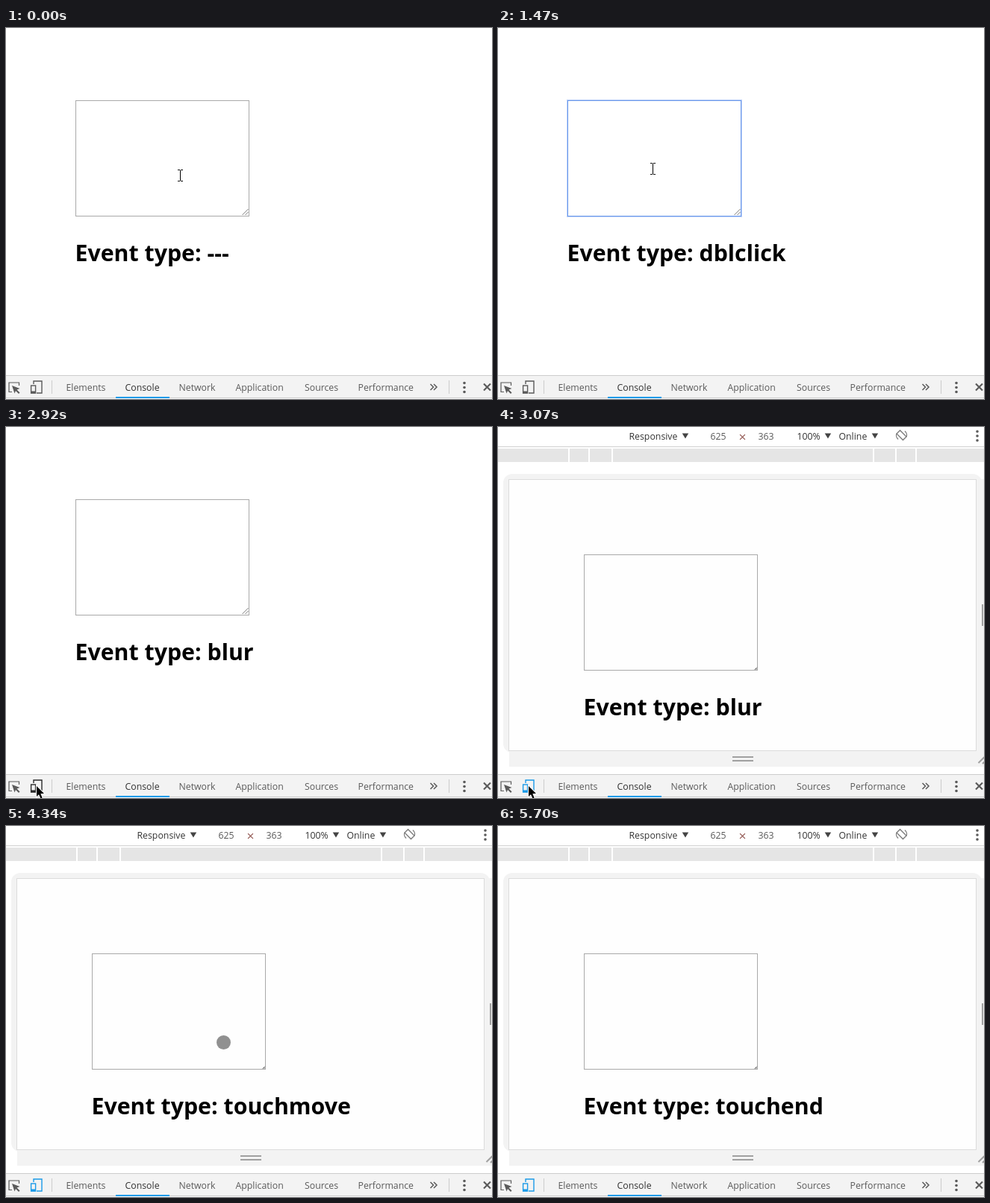
An HTML page with a canvas for the animation above (6140 ms loop, 651 px wide and 498 px high).

```html
<!DOCTYPE html>
<html lang="en">
<head>
<meta charset="utf-8">
<title>Event type</title>
<style>
  html, body { margin: 0; width: 100%; height: 100%; overflow: hidden; background: #fff; }
  canvas { display: block; }
</style>
</head>
<body>
<canvas id="stage" width="651" height="498"></canvas>
<script>
const ctx = document.getElementById('stage').getContext('2d');
const LOOP = 6140;
const FONT = '"Open Sans", "Noto Sans", sans-serif';
const INK = '#5a5a5a';
const BLUE = '#1a9ae8';

// Pointer track: start time, kind, hot spot
const POINTER = [
  [0, 'beam', 233, 198], [120, 'beam', 223, 196], [270, 'beam', 211, 194],
  [1040, 'beam', 207, 189], [1770, 'beam', 225, 230], [1890, 'beam', 253, 300],
  [2010, 'arrow', 246, 354], [2410, 'arrow', 203, 380], [2530, 'arrow', 156, 406],
  [2680, 'arrow', 108, 441], [2800, 'arrow', 66, 468], [2920, 'arrow', 41, 482],
  [3340, 'arrow', 171, 429], [3460, 'touch', 241.5, 393.5], [3610, 'touch', 250.5, 322.5],
  [3760, 'touch', 231.5, 290.5], [4340, 'touch', 291.5, 290.5], [4490, 'touch', 299.5, 289.5],
  [4640, 'touch', 257.5, 289], [4760, 'touch', 205.5, 288.5], [4880, 'touch', 170.5, 288.5],
  [5310, 'touch', 202.5, 298.5], [5460, 'touch', 481.5, 428.5], [5580, 'arrow', 569, 482],
  [5700, 'none', 0, 0]
];
const EVENTS = [
  [0, '---'], [640, 'focus'], [1470, 'dblclick'], [2160, 'blur'],
  [3880, 'touchstart'], [4340, 'touchmove'], [5000, 'touchend']
];
const CARET = [[0, false], [640, true], [1160, false], [1620, true], [2160, false]];

const at = (track, t) => track.filter(k => k[0] <= t).pop();

function rect(x, y, w, h, color) {
  ctx.fillStyle = color;
  ctx.fillRect(x, y, w, h);
}

function box(x, y, w, h, color, width = 1) {
  ctx.strokeStyle = color;
  ctx.lineWidth = width;
  ctx.strokeRect(x, y, w, h);
}

function line(points, color, width = 1) {
  ctx.strokeStyle = color;
  ctx.lineWidth = width;
  ctx.beginPath();
  points.forEach(p => ctx.lineTo(...p));
  ctx.stroke();
}

function poly(points, color) {
  ctx.fillStyle = color;
  ctx.beginPath();
  points.forEach(p => ctx.lineTo(...p));
  ctx.fill();
}

function disc(x, y, r, color) {
  ctx.fillStyle = color;
  ctx.beginPath();
  ctx.arc(x, y, r, 0, Math.PI * 2);
  ctx.fill();
}

function text(str, x, y, color = INK, font = '12.3px ') {
  ctx.font = font + FONT;
  ctx.fillStyle = color;
  ctx.fillText(str, x, y);
}

function dots(x, y) {
  for (let i = 0; i < 3; i++) disc(x, y + i * 6, 1.8, INK);
}

function cross(x, y, r, color, width) {
  line([[x - r, y - r], [x + r, y + r]], color, width);
  line([[x + r, y - r], [x - r, y + r]], color, width);
}

function textarea(x, y, focused, caret) {
  if (focused) {
    box(x - 0.5, y - 0.5, 234, 157, 'rgba(91,141,239,.4)');
    box(x + 0.5, y + 0.5, 232, 155, '#6a98ea');
  } else {
    box(x + 0.5, y + 0.5, 232, 155, '#a9a9a9');
  }
  if (caret) rect(x + 3, y + 4, 1, 13, '#000');
}

function devtools(t, device) {
  rect(0, 466, 651, 32, '#f3f3f3');
  rect(0, 466, 651, 1, '#ccc');
  rect(0, 496, 651, 1, '#ccc');
  rect(0, 497, 651, 1, '#fff');

  // Inspect icon
  line([[17.5, 480], [17.5, 476], [4, 476], [4, 488.5], [8, 488.5]], INK, 1.2);
  poly([[8, 480], [18.5, 484], [14.5, 485.5], [18.5, 489.5], [17, 491], [13, 487], [11.5, 490.5]], INK);

  // Device icon
  const color = device ? BLUE : t >= 2920 ? '#2b2b2b' : INK;
  line([[37, 478], [37, 474], [48, 474], [48, 490], [41, 490]], color, 1.4);
  box(33.6, 480, 6, 10, color, 1.4);
  rect(33, 487.5, 7, 3, color);

  rect(61, 473, 1, 18, '#ccc');
  rect(593, 473, 1, 18, '#ccc');
  rect(147, 495, 72, 2, BLUE);
  const tabs = { Elements: 80.5, Console: 159.5, Network: 231.5, Application: 307.5, Sources: 400, Performance: 471.5 };
  for (const name in tabs) text(name, tabs[name], 487, name === 'Console' ? '#333' : INK);

  for (const x of [568.5, 573]) line([[x, 478], [x + 4, 482], [x, 486]], INK, 1.5);
  dots(614, 476.5);
  cross(644.5, 482, 4.5, INK, 2.2);
}

function desktopPage(label, focused, caret) {
  textarea(93, 97, focused, caret);
  line([[316.5, 251], [324.5, 243]], '#777');
  line([[320.5, 251], [324.5, 247]], '#777');
  text(label, 92.5, 313, '#000', 'bold 30.3px ');
}

function dropdown(name, x, arrowX) {
  text(name, x, 17, '#333');
  poly([[arrowX, 8.5], [arrowX + 8.5, 8.5], [arrowX + 4.25, 15.5]], '#444');
}

function deviceBar() {
  dropdown('Responsive', 175.5, 246.7);
  dropdown('100%', 400.5, 437.7);
  dropdown('Online', 456.5, 500.7);
  text('625', 284.5, 17);
  text('363', 348.5, 17);
  cross(327.5, 13.5, 3.4, '#8a4a44', 1.1);
  dots(642, 6);

  // Rotate icon
  ctx.save();
  ctx.translate(540.5, 11);
  ctx.rotate(Math.PI / 4);
  box(-6, -3.2, 12, 6.4, '#777', 1.3);
  ctx.restore();
  ctx.strokeStyle = '#777';
  for (const a of [-0.9, Math.PI - 0.9]) {
    ctx.beginPath();
    ctx.arc(540.5, 11, 7, a, a + 1.2);
    ctx.stroke();
  }

  rect(0, 26, 651, 1, '#d0d0d0');
  rect(0, 29, 651, 18, '#e5e5e5');
  for (const x of [94, 121, 152, 502, 532, 559]) rect(x, 29, 2, 18, '#fff');
}

function devicePage(label) {
  deviceBar();
  ctx.fillStyle = '#f3f3f3';
  ctx.beginPath();
  ctx.roundRect(7, 63, 641, 374, 12);
  ctx.fill();
  rect(640, 70, 11, 386, '#f3f3f3');
  rect(15, 434, 636, 22, '#f3f3f3');
  rect(15, 71, 625, 363, '#fefefe');
  box(14.5, 70.5, 626, 364, '#dcdcdc');

  rect(314, 442, 28, 2, '#a0a0a0');
  rect(314, 447, 28, 2, '#a0a0a0');
  rect(648, 238, 2, 29, '#a0a0a0');
  line([[643.5, 451], [651.5, 443]], '#a0a0a0', 2);
  line([[649, 452], [652, 449]], '#a0a0a0', 2);

  textarea(115, 171, false, false);
  line([[343.5, 326], [347, 322.5]], '#777');
  rect(345, 324, 1.5, 1.5, '#666');
  text(label, 114.5, 387, '#000', 'bold 30.3px ');
}

const pointers = {
  none() {},
  beam(x, y) {
    for (const end of [y - 8, y + 7]) {
      rect(x - 3, end, 3, 1, '#000');
      rect(x + 1, end, 3, 1, '#000');
    }
    rect(x, y - 7, 1, 14, '#000');
  },
  arrow(x, y) {
    const shape = [[0, 0], [0, 14], [3, 11.2], [5.4, 16.5], [7.6, 15.5], [5.3, 10.3], [10, 10]]
      .map(p => [x + p[0], y + p[1]]);
    ctx.lineJoin = 'miter';
    line([...shape, shape[0], shape[1]], '#fff', 2);
    poly(shape, '#000');
  },
  touch(x, y) { disc(x, y, 9.5, 'rgba(70,70,70,.6)'); }
};

function draw(t) {
  const device = t >= 3070;
  const label = 'Event type: ' + at(EVENTS, t)[1];
  const [, kind, x, y] = at(POINTER, t);
  rect(0, 0, 651, 498, '#fff');
  if (device) devicePage(label);
  else desktopPage(label, t >= 640 && t < 2160, at(CARET, t)[1]);
  devtools(t, device);
  pointers[kind](x, y);
}

const start = performance.now();
function tick() {
  draw((performance.now() - start) % LOOP);
  requestAnimationFrame(tick);
}
tick();
</script>
</body>
</html>
```
